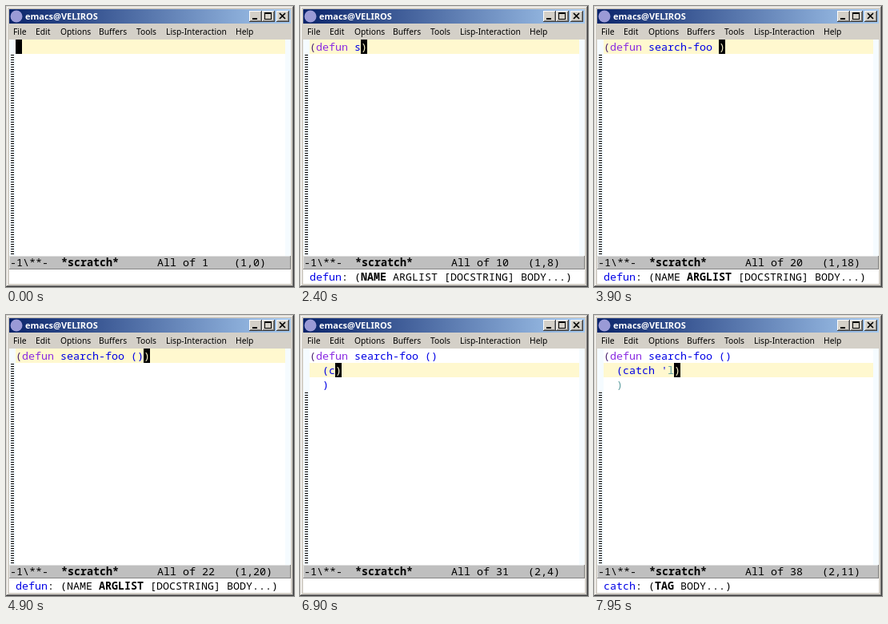
An HTML page for the animation above (8000 ms loop, 360 by 352 pixels).

```html
<!DOCTYPE html>
<html lang="en">
<head>
<meta charset="utf-8">
<title>Editor</title>
<style>
  html, body { margin: 0; width: 100%; height: 100%; overflow: hidden; background: #d4d0c8; }
  svg, div { position: absolute; left: 0; top: 0; }
  div { font: 13.333px/18px "Noto Sans Mono", "DejaVu Sans Mono", monospace; white-space: pre; color: #000; }
  b { font-weight: 700; }
  #line { left: 12px; width: 337px; height: 18px; background: #fff8cf; }
  #cursor { width: 8px; height: 18px; background: #000; }
  #code { left: 12px; top: 42px; }
  #mode { left: 5px; top: 312px; }
  #echo { left: 12px; top: 330px; }
  #echo i { font-style: normal; color: #0000e6; }
  .menu { font: 10.3px "Noto Sans", "Open Sans", sans-serif; }
  .title { font: bold 11px "Noto Sans", "Open Sans", sans-serif; fill: #fff; }
</style>
</head>
<body>
<svg width="360" height="352" shape-rendering="crispEdges">
  <defs>
    <linearGradient id="bar"><stop stop-color="#0a246a"/><stop offset="1" stop-color="#a6caf0"/></linearGradient>
    <pattern id="dashes" x="6" y="61" width="5" height="3" patternUnits="userSpaceOnUse">
      <path d="M0 .5h4" stroke="#000"/>
    </pattern>
    <g id="button">
      <path d="M0 0h16v14h-16z" fill="#404040"/>
      <path d="M0 0h15v13h-15z" fill="#fff"/>
      <path d="M1 1h14v12h-14z" fill="#808080"/>
      <path d="M1 1h13v11h-13z" fill="#d4d0c8"/>
    </g>
  </defs>
  <path d="M0 0h360v352h-360z" fill="#404040"/>
  <path d="M0 0h359v351h-359z" fill="#d4d0c8"/>
  <path d="M1 1h358v350h-358z" fill="#808080"/>
  <path d="M1 1h357v349h-357z" fill="#fff"/>
  <path d="M2 2h356v348h-356z" fill="#d4d0c8"/>
  <path d="M4 4h352v18h-352z" fill="url(#bar)"/>
  <circle cx="13" cy="13" r="7.5" fill="#9a9ad6" shape-rendering="auto"/>
  <text class="title" x="24" y="17">emacs@VELIROS</text>
  <use href="#button" x="304" y="6"/>
  <use href="#button" x="320" y="6"/>
  <use href="#button" x="338" y="6"/>
  <path d="M308 15h6v2h-6zM323 8h9v9h-9zM324 10v6h7v-6z" fill-rule="evenodd"/>
  <path d="M342 9l7 7M349 9l-7 7" stroke="#000" stroke-width="1.7" shape-rendering="auto"/>
  <g class="menu">
    <text x="9" y="36">File</text><text x="37" y="36">Edit</text>
    <text x="68" y="36">Options</text><text x="116" y="36">Buffers</text>
    <text x="163" y="36">Tools</text><text x="200" y="36">Lisp-Interaction</text>
    <text x="287" y="36">Help</text>
  </g>
  <path d="M4 42h352v306h-352z" fill="#fff"/>
  <path d="M4 42h8v271h-8zM349 42h7v271h-7z" fill="#f5fbff"/>
  <rect id="empty" x="6" width="4" fill="url(#dashes)"/>
  <path d="M4 313h352v17h-352z" fill="#bfbfbf"/>
  <path d="M4 313.5h352M4.5 313v17" stroke="#dedede"/>
  <path d="M4 329.5h352M355.5 313v17" stroke="#858585"/>
</svg>
<div id="line"></div>
<div id="cursor"></div>
<div id="code"></div>
<div id="mode"></div>
<div id="echo"></div>
<script>
const $ = id => document.getElementById(id);

// [start, text inserted before the cursor, text after it, ms per key (0 = all at once)]
const edits = [
  [1000, "(", ")", 0],
  [1500, "defun search-foo ", ")", 150],
  [4400, "(", "))", 0],
  [4900, ")", ")", 0],
  [5400, "\n  ", "\n  )", 0],
  [6400, "(", ")\n  )", 0],
  [6900, "catch 'l", ")\n  )", 150]
];

const defun = "NAME ARGLIST [DOCSTRING] BODY...";
const hints = [
  [0], [2250, "defun", defun, "NAME"], [3900, "defun", defun, "ARGLIST"],
  [5400, "defun", defun, "[DOCSTRING]"], [6900], [7650, "catch", "TAG BODY...", "TAG"]
];

const syntax = [
  [/[()]/g, "#4b2370"],
  [/(?<=foo )\(\)?/g, "#101c70"],
  [/(?<=foo \()\)/g, "#101c70"],
  [/(?<=\()(defun|catch)\b/g, "#8a2be2"],
  [/(?<=defun )[\w-]+/g, "#0000e6"],
  [/(?<=')\w+/g, "#5f9ea0"]
];

function colorize(text, point) {
  const colors = [];
  for (const [re, color] of syntax)
    for (const m of text.matchAll(re)) colors.fill(color, m.index, colors.length = Math.max(colors.length, m.index + m[0].length)),
      [...m[0]].forEach((_, i) => colors[m.index + i] = color);
  colors[point] = "#fff8cf";
  return [...text].map((ch, i) => `<span style="color:${colors[i] || "#000"}">${ch}</span>`).join("");
}

function draw(t) {
  let before = "", after = "";
  for (const [start, text, tail, step] of edits) {
    if (t < start) break;
    before += step ? text.slice(0, Math.floor((t - start) / step) + 1) : text;
    after = tail;
  }
  const text = before + after;
  const rows = before.split("\n"), row = rows.length, col = rows[row - 1].length;
  const top = 24 + row * 18;
  $("line").style.top = $("cursor").style.top = top + "px";
  $("cursor").style.left = 12 + col * 8 + "px";
  $("code").innerHTML = colorize(text, before.length);

  const emptyTop = 42 + text.split("\n").length * 18;
  $("empty").setAttribute("y", emptyTop);
  $("empty").setAttribute("height", 313 - emptyTop);

  const size = String(text.length + 1).padEnd(5);
  $("mode").innerHTML = `-1\\**-  <b>*scratch*</b>      All of ${size}(${row},${col})`;
  const [, name, args, current] = hints.findLast(h => t >= h[0]);
  $("echo").innerHTML = name ? `<i>${name}</i>: (${args.replace(current, "<b>$&</b>")})` : "";
}

function tick() {
  draw(performance.now() % 8000);
  requestAnimationFrame(tick);
}
tick();
</script>
</body>
</html>
```
